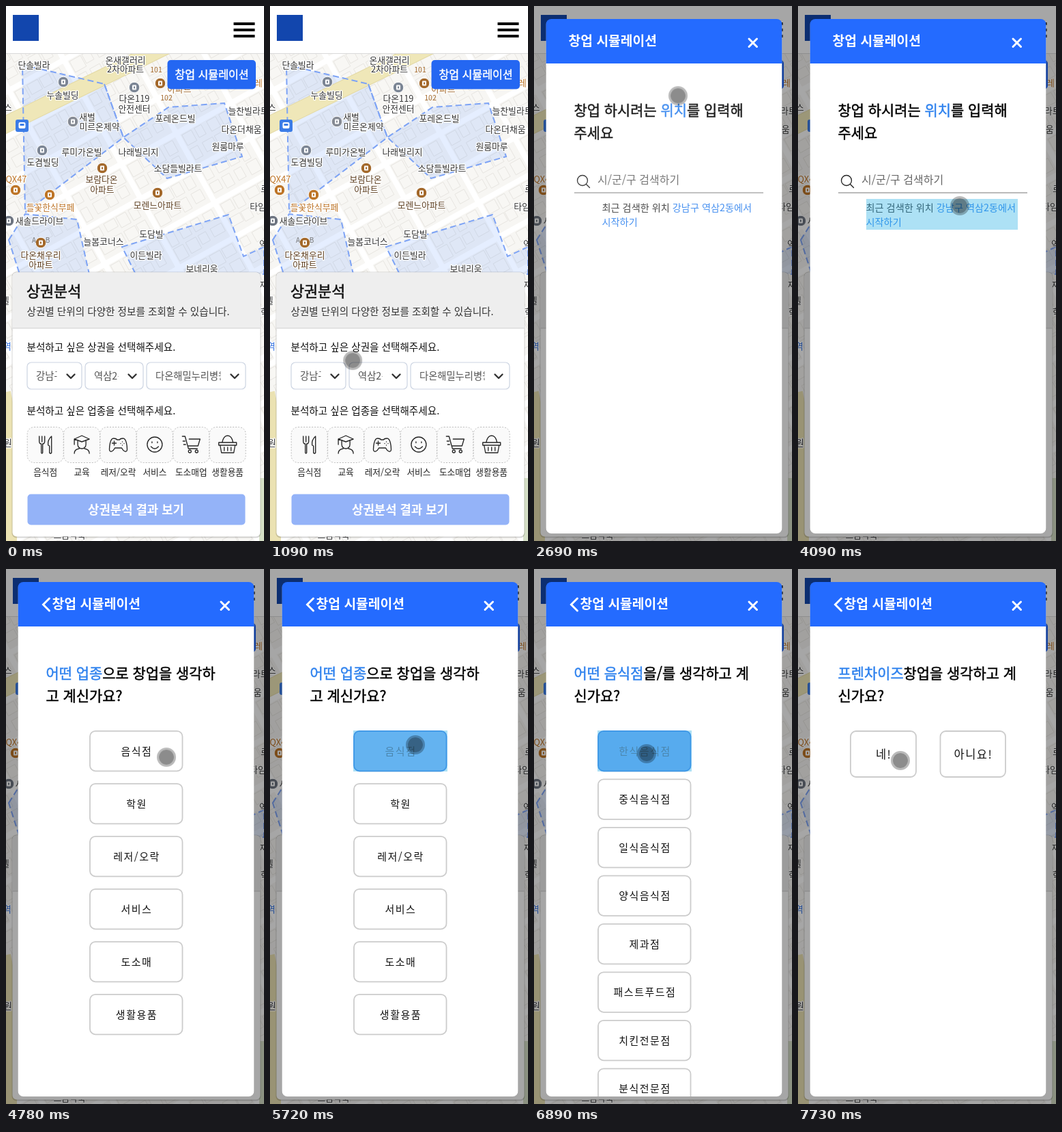
Recreate the animation shown at these times as an HTML page. Size 378 px wide and 782 px high, loop 8 s.

```html
<!DOCTYPE html>
<html lang="ko">
<head>
<meta charset="utf-8">
<title>창업 시뮬레이션</title>
<style>
html, body { margin: 0; width: 100%; height: 100%; overflow: hidden; background: #fff; }
svg { display: block; width: 100vw; height: 100vh; font-family: "Noto Sans CJK KR", "Noto Sans CJK", "Noto Sans CJK JP", sans-serif; }
text { white-space: pre; fill: currentColor; }
tspan { color: #2f82ee; }
.mid { text-anchor: middle; }
.medium { stroke: currentColor; stroke-width: .5px; }
.label { paint-order: stroke; stroke: #fff; stroke-width: 2.5px; stroke-linejoin: round; }
.line { fill: none; stroke: #262626; stroke-width: 1.35; stroke-linecap: round; stroke-linejoin: round; }
.spaced { letter-spacing: 1.5px; }
.step { animation: 8s step-end infinite; }
#dim, #modal { animation: open 8s linear infinite; }
#p1 { animation-name: p1; }
#p2 { animation-name: p2; }
#p3 { animation-name: p3; }
#p4 { animation-name: p4; }
#back { animation-name: back; }
#title { animation-name: title; }
#tap1 { animation-name: tap1; }
#tap2 { animation: tap2 8s linear infinite; }
#tap3 { animation: tap3 8s linear infinite; }
#cursor { animation: cursor 8s linear infinite; }
@keyframes open { 0%, 28.4% { opacity: 0 } 29.6%, 100% { opacity: 1 } }
@keyframes p1 { 0% { opacity: 0 } 28.4% { opacity: .88 } 34.4% { opacity: 1 } 52.75%, 100% { opacity: 0 } }
@keyframes p2 { 0% { opacity: 0 } 52.75% { opacity: 1 } 72.25%, 100% { opacity: 0 } }
@keyframes p3 { 0% { opacity: 0 } 72.25% { opacity: 1 } 87%, 100% { opacity: 0 } }
@keyframes p4 { 0% { opacity: 0 } 87%, 100% { opacity: 1 } }
@keyframes back { 0% { opacity: 0 } 52.75%, 100% { opacity: 1 } }
@keyframes title { 0% { transform: none } 52.75%, 100% { transform: translateX(17px) } }
@keyframes tap1 { 0% { opacity: 0 } 50.25% { opacity: 1 } 52.75%, 100% { opacity: 0 } }
@keyframes tap2 { 0%, 69% { opacity: 0 } 70.5%, 100% { opacity: 1 } }
@keyframes tap3 { 0%, 84.4% { opacity: 0 } 85.8%, 100% { opacity: 1 } }
@keyframes cursor {
  0%, 3% { transform: translate(396px, 762px) }
  3.25% { transform: translate(378px, 741px) }
  5.2% { transform: translate(362px, 610px) }
  6.2% { transform: translate(340px, 520px) }
  7.2% { transform: translate(302px, 430px) }
  8.2% { transform: translate(255px, 375px) }
  9.2% { transform: translate(215px, 361px) }
  10.2% { transform: translate(180px, 385px) }
  11.3% { transform: translate(152px, 435px) }
  12.75% { transform: translate(133px, 490px) }
  13.65% { transform: translate(121px, 518.5px) }
  14.6% { transform: translate(102px, 590px) }
  15.7% { transform: translate(104px, 660px) }
  16.7% { transform: translate(126px, 714px) }
  17.6% { transform: translate(155px, 730px) }
  18.8% { transform: translate(196px, 675px) }
  20% { transform: translate(222px, 560px) }
  21.3% { transform: translate(232px, 420px) }
  22.5% { transform: translate(235px, 290px) }
  23.3% { transform: translate(236px, 215px) }
  24.8% { transform: translate(265px, 140px) }
  26.2% { transform: translate(292px, 104px) }
  28.7% { transform: translate(296px, 102px) }
  30.6% { transform: translate(270px, 110px) }
  32.5% { transform: translate(225px, 127px) }
  33.6% { transform: translate(211px, 131px) }
  35% { transform: translate(212px, 140px) }
  37% { transform: translate(222px, 180px) }
  39.4% { transform: translate(245px, 240px) }
  41.9% { transform: translate(255px, 290px) }
  43.6% { transform: translate(244px, 305px) }
  45.1% { transform: translate(236px, 287px) }
  46.9%, 53.5% { transform: translate(237px, 292px) }
  59.8% { transform: translate(235px, 275px) }
  61.2% { transform: translate(229px, 270px) }
  63.3%, 74% { transform: translate(213px, 257px) }
  78.5% { transform: translate(192px, 258px) }
  81% { transform: translate(171px, 267px) }
  83%, 88.2% { transform: translate(165px, 270px) }
  90.5% { transform: translate(184px, 292px) }
  93% { transform: translate(182px, 302px) }
  95% { transform: translate(159px, 287px) }
  96.6%, 100% { transform: translate(150px, 280px) }
}
</style>
</head>
<body>
<svg id="stage" viewBox="0 0 378 782" preserveAspectRatio="none"></svg>
<script>
// Text placed by the vertical centre of its glyphs.
const text = (x, cy, s, size, color = '#222', cls = '', weight = 400) =>
  `<text x="${x}" y="${(cy + size * .37).toFixed(1)}" font-size="${size}" style="color:${color}" font-weight="${weight}" class="${cls}">${s}</text>`;
const rect = (x, y, w, h, fill, r = 0, extra = '') =>
  `<rect x="${x}" y="${y}" width="${w}" height="${h}" rx="${r}" fill="${fill}" ${extra}/>`;
const path = (d, stroke, width, extra = '') =>
  `<path d="${d}" fill="none" stroke="${stroke}" stroke-width="${width}" ${extra}/>`;
const blue = s => `<tspan>${s}</tspan>`;

let seed = 11;
const rand = () => (seed = (seed * 16807) % 2147483647) / 2147483647;

function streets() {
  let out = '';
  for (let y = -60; y < 1000; y += 58)
    for (let x = -420; x < 440; x += 92) {
      out += rect(x, y, 84, 50, '#f7f6f3', 1);
      for (let i = 0; i < 8; i++) {
        const w = 11 + rand() * 8, h = 13 + rand() * 8;
        out += rect((x + 2 + i % 4 * 20.5).toFixed(1), y + 2 + (i >> 2) * 24, w.toFixed(1), h.toFixed(1), '#f8f7f4', 0, 'stroke="#e4e2de" stroke-width=".8"');
      }
    }
  return `<g transform="rotate(-29)">${out}</g>`;
}

const zones = [
  'M24 86L144 114 172 192 28 302Z',
  'M144 114L172 192 238 148 320 142 346 220 236 252 172 192',
  'M4 342L28 304 104 312 122 392H20Z',
  'M170 352L326 305 348 366 378 352V392H190Z'
];

function pin(x, y, color) {
  return `<circle cx="${x}" cy="${y}" r="7.8" fill="${color}" stroke="#fff"/>` +
    rect(x - 3, y - 3.5, 6, 7, '#fff', 1) + rect(x - 1, y - 1.5, 2, 3, color);
}

const ink = '#333', brown = '#a3682a', orange = '#bd7426', umber = '#5c3d1e';
const labels = [
  [41, 86, '단솔빌라'], [175, 79, '온새갤러리'], [175, 92, '2차아파트'],
  [254, 121, '아파트', brown], [83, 130, '누솔빌딩'], [188, 135, '다온119'], [188, 150, '안전센터'],
  [119, 162, '새벌'], [137, 176, '미르온제약'], [248, 164, '포레온드빌'], [355, 153, '늘찬빌라트'],
  [345, 180, '다온더채움'], [325, 205, '원룸마루'], [111, 213, '루미가온빌'], [194, 213, '나래빌리지'],
  [54, 228, '도겸빌딩'], [252, 237, '소담들빌라트'], [15, 253, 'QX47', orange],
  [140, 253, '보람다온', umber], [141, 268, '아파트', umber], [65, 294, '들꽃한식부페', orange],
  [222, 291, '모렌느아파트', umber], [49, 314, '새솔드라이브'], [143, 344, '늘봄코너스'],
  [213, 333, '도담빌'], [205, 364, '이든빌라'], [51, 364, '다온채우리', umber], [51, 378, '아파트', umber],
  [287, 384, '보네리움'], [369, 293, '타임'], [379, 267, '로'], [370, 112, '레', orange], [3, 148, '스'],
  [-1, 430, '벨'], [2, 497, '역', '#2f6fe0'], [3, 638, '원'], [377, 407, '지'], [379, 447, '학'], [377, 348, '역'],
  [93, 773, '으뜸약국']
];

function map() {
  const pins = [[84, 111, '#7b8594'], [53, 211, '#7b8594'], [98, 169, '#858a93'], [188, 119, '#7b8594'],
    [226, 113, brown], [141, 237, brown], [222, 273, brown], [64, 276, orange], [14, 269, orange],
    [51, 346, brown], [4, 314, '#6d7480']];
  const avenue = 'M240 56L140 105 -12 179';
  return rect(0, 70, 378, 712, '#fff') + streets() +
    zones.map(d => `<path d="${d}" fill="#4a86ff" fill-opacity=".14"/>`).join('') +
    path(avenue, '#e3d9a5', 25) + path(avenue, '#efe7b8', 23) +
    path('M-4 565L5 610V782', '#ebe2b2', 22) + path('M378 690V782', '#d5dfc6', 14) +
    zones.map(d => path(d, '#7da3f5', 2, 'stroke-dasharray="9 5"')).join('') +
    pins.map(p => pin(...p)).join('') +
    rect(14, 166, 19, 18, '#3b7ce6', 3) + rect(18.5, 170, 10, 9, '#fff', 2) + rect(20.5, 172, 6, 3, '#3b7ce6') +
    labels.map(([x, y, s, c = ink]) => text(x, y, s, 12.8, c, 'mid label')).join('') +
    text(220, 93, '101', 10.5, brown, 'mid') + text(235, 134, '102', 10.5, brown, 'mid') +
    text(41, 342, 'A', 10, '#777', 'mid') + text(61, 342, 'B', 10, '#777', 'mid');
}

function header() {
  return rect(0, 0, 378, 69, '#fff') + rect(0, 69, 378, 1, '#d9d9d9') +
    rect(10, 13, 38, 38, '#1246ad') +
    [24, 33, 42].map(y => rect(333.5, y, 31, 4, '#000')).join('') +
    rect(236.5, 79, 129.5, 42.5, '#2467f2', 5) + text(301.5, 100, '창업 시뮬레이션', 16.1, '#fff', 'mid medium');
}

const icons = [
  ['음식점', 'M-9 -12V-5Q-9 -1 -6 -1V12Q-5 14 -4 12V-1Q-1 -1 -1 -5V-12M-5 -12V-4M9 -12Q3 -7 4 1L6 2V12Q7.500 14 9 12Z'],
  ['교육', 'M-11 -8L0 -13 11 -8 0 -4ZM-6 -5V0A6 6 0 0 0 6 0V-5M-11 -8V0M-11 13Q-11 7 -4 6M4 6Q11 7 11 13'],
  ['레저/오락', 'M-7 -9Q-3 -9 -2 -7H2Q3 -9 7 -9C12 -9 13 3 13 7C13 12 8 11 5 5H-5C-8 11 -13 12 -13 7C-13 3 -12 -9 -7 -9ZM-6 -5V1M-9 -2H-3M6 -4V-3.900M6 1V1.100M3.500 -1.500V-1.400M8.500 -1.500V-1.400'],
  ['서비스', 'M-11 0A11 11 0 1 1 11 0A11 11 0 1 1 -11 0M-5.500 3Q0 9 5.500 3M-4 -4V-2.500M4 -4V-2.500'],
  ['도소매업', 'M-13 -12H-9L-4 6H9M-3 -8H13L10 2H-4M-12 -5H-9M-11 0H-8M-4 10A2 2 0 1 0 0 10A2 2 0 1 0 -4 10M6 10A2 2 0 1 0 10 10A2 2 0 1 0 6 10'],
  ['생활용품', 'M-13 -3H13V1H-13ZM-11 1L-9 12H9L11 1M-8 -3Q-6 -13 0 -13Q6 -13 8 -3M-5 4V9M0 4V9M5 4V9']
];

function select(x, w, s) {
  const cx = x + w - 16.5;
  return rect(x, 521, w, 39, '#fff', 6, 'stroke="#ccd4e2" stroke-width="1.2"') +
    `<svg x="${x}" y="521" width="${w - 36.5}" height="39">${text(13, 20, s, 14.3, '#555')}</svg>` +
    path(`M${cx - 5} 538.500l5.500 5.500 5.500 -5.500`, '#333', 2.4, 'stroke-linecap="round" stroke-linejoin="round"');
}

function panel() {
  return rect(8.5, 388.5, 365, 389, '#000', 7, 'opacity=".16"') +
    rect(9.5, 389.5, 363, 386, '#fff', 6) +
    `<path d="M9.500 471V396q0 -6.500 6.500 -6.500H366q6.500 0 6.500 6.500V471Z" fill="#eee"/>` +
    rect(9.5, 470.5, 363, 1, '#cfcfcf') +
    text(30, 417, '상권분석', 21.8, '#111', 'medium') +
    text(30.5, 447, '상권별 단위의 다양한 정보를 조회할 수 있습니다.', 14.6, '#333') +
    text(30.5, 499, '분석하고 싶은 상권을 선택해주세요.', 14.6, '#111') +
    select(31, 80, '강남구') + select(116, 85, '역삼2동') + select(206, 145, '다온해밀누리병원') +
    text(30.5, 592, '분석하고 싶은 업종을 선택해주세요.', 14.6, '#111') +
    icons.map(([s, d], i) => {
      const x = 57.7 + i * 53.4;
      return rect(x - 26.5, 615.5, 53, 52, '#fafafa', 10, 'stroke="#bbb" stroke-dasharray="2 2"') +
        `<path class="line" d="${d}" transform="translate(${x} 641)"/>` + text(x, 681, s, 12.7, '#222', 'mid');
    }).join('') +
    rect(31.5, 713.5, 319, 45, '#94b3f8', 5) + text(190.5, 736, '상권분석 결과 보기', 17.8, '#fff', 'mid', 700);
}

const heading = (a, b) => text(58.5, 152, a, 20.9, '#000', 'medium') + text(58.5, 185, b, 20.9, '#000', 'medium');
const button = (x, y, w, h, s, size = 15) =>
  rect(x, y, w, h, '#fff', 8, 'stroke="#ccc" stroke-width="1.8"') +
  text(x + w / 2 + .7, y + h / 2, s, size, '#111', 'mid spaced');
const list = (x, pitch, items) => items.map((s, i) => button(x, 236.8 + i * pitch, 135.5, 58.5, s)).join('');
const pressed = (id, x, fill, s) => `<g id="${id}">` + rect(x - 1, 236, 138, 60, '#ade0f5') +
  rect(x, 236.8, 135.5, 58.5, fill, 8, 'stroke="#3e97e6" stroke-width="1.8"') +
  text(x + 68.5, 266, s, 15, '#4b86ae', 'mid spaced') + '</g>';
const page = (n, body) => `<g id="p${n}" class="step">${body}</g>`;

function modal() {
  return `<g id="modal" clip-path="url(#card)">` + rect(17.5, 19, 346, 752, '#fff') + rect(17.5, 19, 346, 65, '#246bff') +
    `<g id="title" class="step">${text(50.5, 51, '창업 시뮬레이션', 19.3, '#fff', '', 700)}</g>` +
    `<g id="back" class="step">${path('M63.500 43L54.500 52 63.500 61', '#fff', 3, 'stroke-linecap="round"')}</g>` +
    path('M315 48L326.500 59.500M326.500 48L315 59.500', '#fff', 3, 'stroke-linecap="round"') +
    page(1, heading(`창업 하시려는 ${blue('위치')}를 입력해`, '주세요') +
      `<circle cx="71" cy="255" r="7.500" class="line"/><path class="line" d="M76.500 260.500L81.500 265.500"/>` +
      text(93, 254, '시/군/구 검색하기', 16, '#666') + rect(59, 272.5, 277, 1, '#777') +
      text(99.5, 294.3, `최근 검색한 위치 ${blue('강남구 역삼2동에서')}`, 14.2, '#333') +
      text(99.5, 315.8, blue('시작하기'), 14.2) +
      `<g id="tap1" class="step">${rect(100, 282, 222, 45, 'rgba(51,181,229,.4)')}</g>`) +
    page(2, heading(`${blue('어떤 업종')}으로 창업을 생각하`, '고 계신가요?') +
      list(123, 77, ['음식점', '학원', '레저/오락', '서비스', '도소매', '생활용품']) +
      pressed('tap2', 123, '#64b3f0', '음식점')) +
    page(3, heading(`${blue('어떤 음식점')}을/를 생각하고 계`, '신가요?') +
      list(94, 70.5, ['한식음식점', '중식음식점', '일식음식점', '양식음식점', '제과점', '패스트푸드점', '치킨전문점', '분식전문점']) +
      pressed('tap3', 94, '#57abee', '한식음식점')) +
    page(4, heading(`${blue('프렌차이즈')}창업을 생각하고 계`, '신가요?') +
      button(77, 237, 96, 67, '네!', 16.5) + button(208.5, 237, 95.5, 67, '아니요!', 16.5)) +
    '</g>';
}

document.getElementById('stage').innerHTML =
  '<defs><clipPath id="card"><rect x="17.500" y="19" width="346" height="752" rx="8"/></clipPath></defs>' +
  map() + header() + panel() +
  `<g id="dim">${rect(0, 0, 378, 782, 'rgba(0,0,0,.35)')}</g>` + modal() +
  '<g id="cursor"><circle r="12.500" fill="none" stroke="#000" stroke-opacity=".27" stroke-width="3"/><circle r="11" fill="#000" fill-opacity=".45"/></g>';
</script>
</body>
</html>
```
